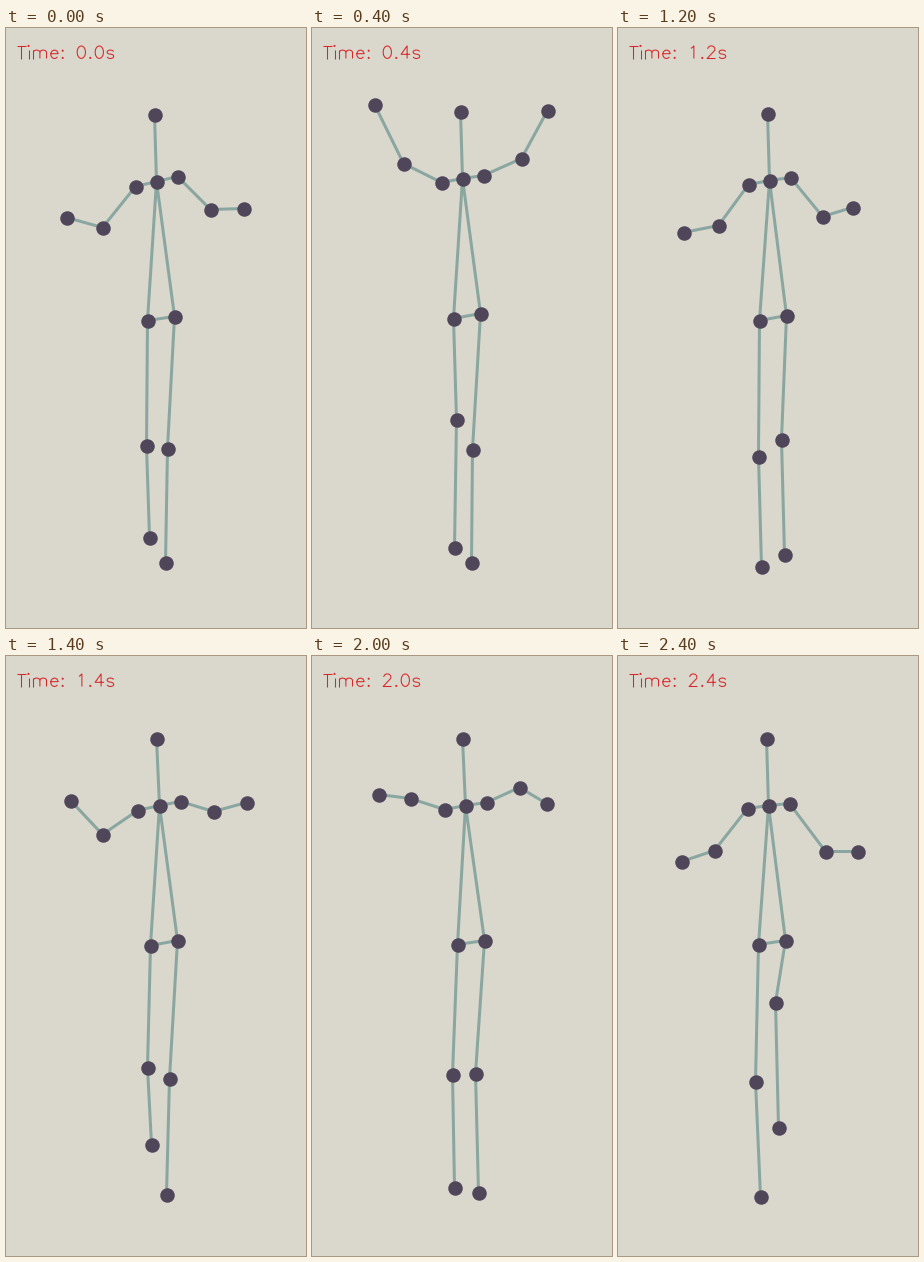
A matplotlib script for the animation above (2.5 s loop, 300x600 px).

```python
import numpy as np
import matplotlib.pyplot as plt
from matplotlib.animation import FuncAnimation
from matplotlib.collections import LineCollection

W, H, DPI = 300, 600, 100
FRAMES, STEP = 25, 100
BACK, BONE, JOINT, RED = "#dad7cd", "#8aa6a0", "#50465a", "#d62828"
PX = 72 / DPI

# --- motion -----------------------------------------------------------
KEYS = np.arange(7) * 0.4
CYCLE = 1.3  # seconds for one left and right step
TIMES = np.arange(FRAMES) * STEP / 1000


def hermite(knots, values):
    """Smooth curve through the knots, sampled at every frame time."""
    slope = np.gradient(values, knots, axis=0)
    i = np.clip(np.searchsorted(knots, TIMES + 1e-9) - 1, 0, len(knots) - 2)
    h = (knots[i + 1] - knots[i])[:, None]
    u = (TIMES - knots[i])[:, None] / h
    return ((1 + 2 * u) * (1 - u) ** 2 * values[i]
            + u * (1 - u) ** 2 * h * slope[i]
            + u ** 2 * (3 - 2 * u) * values[i + 1]
            + u ** 2 * (u - 1) * h * slope[i + 1])


def once(*values):
    return hermite(KEYS, np.array(values, float).reshape(len(KEYS), -1))


def cyclic(*points):
    """The two steps resemble each other, so each guides the other."""
    knots = np.concatenate([KEYS - CYCLE, KEYS, KEYS + CYCLE])
    order = np.argsort(knots)
    return hermite(knots[order], np.tile(np.array(points, float), (3, 1))[order])


neck = once((150, 153), (150, 150), (150, 151), (151, 152),
            (154, 147), (153, 149), (150, 149))
lean = once(0, 0, -1, -1, 1, 1, -1) * [1, 0]
tilt = once(1, 0, 0, 0, 1, 0, -0.5) * [0, 1]

joints = {
    "neck": neck,
    "head": neck + [-2.3, -67] - 0.7 * lean,
    "l_shoulder": neck + [-21.3, 3.8] + tilt,
    "r_shoulder": neck + [21.2, -3.2] - 1.6 * tilt,
    "l_hip": neck + [-9, 139.5] + lean,
    "r_hip": neck + [18, 135] + lean,
}
# arms hang from the neck
joints["l_elbow"] = neck + cyclic((-54, 46), (-59, -15), (-55, -7), (-51, 45),
                                  (-60, -17), (-55, -7), (-54, 45))
joints["l_wrist"] = neck + cyclic((-90, 36), (-88, -74), (-84, 23), (-86, 52),
                                  (-84, -86), (-87, -11), (-87, 56))
joints["r_elbow"] = neck + cyclic((54, 28), (59, -20), (53, -13), (53, 36),
                                  (57, -35), (54, -18), (57, 46))
joints["r_wrist"] = neck + cyclic((87, 27), (85, -68), (76, 28), (83, 27),
                                  (85, -76), (81, -2), (89, 46))
# legs stand on the floor
joints["l_knee"] = cyclic((140, 417), (144, 391), (141, 427), (140, 428),
                          (144, 403), (140, 418), (137, 425))
joints["l_ankle"] = cyclic((143, 509), (142, 519), (142, 538), (143, 538),
                           (146, 488), (142, 531), (142, 540))
joints["r_knee"] = cyclic((161, 420), (160, 421), (159, 399), (163, 411),
                          (167, 417), (163, 417), (157, 346))
joints["r_ankle"] = cyclic((159, 534), (159, 534), (157, 495), (166, 526),
                           (167, 538), (166, 536), (160, 471))
joints = {name: np.rint(path) for name, path in joints.items()}

CHAINS = ["head neck", "l_hip r_hip"]
for side in "lr":
    CHAINS.append(f"neck {side}_shoulder {side}_elbow {side}_wrist")
    CHAINS.append(f"neck {side}_hip {side}_knee {side}_ankle")


# --- stroke lettering -------------------------------------------------
def arc(cx, cy, rx, ry, start=0, end=360):
    a = np.radians(np.linspace(start, end, 15))
    return list(zip(cx + rx * np.cos(a), cy + ry * np.sin(a)))


def dot(x, y):
    return arc(x, y, 0.9, 0.9)


def arch(x):
    return [(x, 10)] + arc(x + 5.5, 10, 5.5, 4, 150, 0) + [(x + 11, 0)]


six = arc(11, 10.5, 7.5, 10.5, 50, 180) + arc(10, 6.5, 6.5, 6.5, 180, 540)

# advance width, then strokes; baseline at 0, capitals 21 high
GLYPHS = {
    " ": (16, []),
    "T": (16, [[(1, 21), (15, 21)], [(8, 21), (8, 0)]]),
    "i": (8, [dot(4, 21), [(4, 14), (4, 0)]]),
    "m": (30, [[(4, 14), (4, 0)], arch(4), arch(15)]),
    "e": (18, [[(3, 8), (15, 8)] + arc(9.3, 7, 6.2, 7, 10, 322)]),
    "s": (17, [arc(8.5, 10.7, 5.5, 3.4, 15, 260)
               + arc(8.5, 3.6, 5.5, 3.6, 80, -165)]),
    ":": (10, [dot(5, 13), dot(5, 1)]),
    ".": (10, [dot(5, 1)]),
    "0": (20, [arc(10, 10.5, 7, 10.5)]),
    "1": (20, [[(6, 17), (8, 18), (11, 21), (11, 0)]]),
    "2": (20, [arc(10, 15.5, 6, 5.5, 175, -25) + [(3, 0), (17, 0)]]),
    "3": (20, [[(5, 21), (16, 21)] + arc(10, 6.5, 7, 6.5, 90, -158)]),
    "4": (20, [[(13, 0), (13, 21), (3, 7), (18, 7)]]),
    "5": (20, [[(15, 21), (5, 21)] + arc(10, 7, 7, 7, 142, -155)]),
    "6": (20, [six]),
    "7": (20, [[(3, 21), (17, 21), (7, 0)]]),
    "8": (20, [arc(10, 16.5, 5.5, 4.5), arc(10, 6, 7, 6)]),
    "9": (20, [[(20 - x, 21 - y) for x, y in six]]),
}


def lettering(text, x, y, scale):
    strokes = []
    for char in text:
        width, shape = GLYPHS[char]
        strokes += [np.array(s) * [scale, -scale] + [x, y] for s in shape]
        x += width * scale
    return strokes


# --- stage ------------------------------------------------------------
fig = plt.figure(figsize=(W / DPI, H / DPI), dpi=DPI, facecolor=BACK)
ax = fig.add_axes([0, 0, 1, 1])
ax.set_xlim(-0.5, W - 0.5)
ax.set_ylim(H - 0.5, -0.5)
ax.axis("off")

bones = LineCollection([], colors=BONE, linewidths=3 * PX, zorder=1)
label = LineCollection([], colors=RED, linewidths=1.05 * PX, zorder=3)
ax.add_collection(bones, autolim=False)
ax.add_collection(label, autolim=False)
dots, = ax.plot([], [], "o", color=JOINT, ms=14.5 * PX, mew=0, zorder=2)


def draw(n):
    bones.set_segments([np.array([joints[j][n] for j in chain.split()])
                        for chain in CHAINS])
    dots.set_data(*np.array([path[n] for path in joints.values()]).T)
    label.set_segments(lettering(f"Time: {TIMES[n]:.1f}s", 10, 30, 0.6))
    return bones, dots, label


anim = FuncAnimation(fig, draw, frames=FRAMES, interval=STEP, repeat=True,
                     repeat_delay=0)
plt.show()
```
